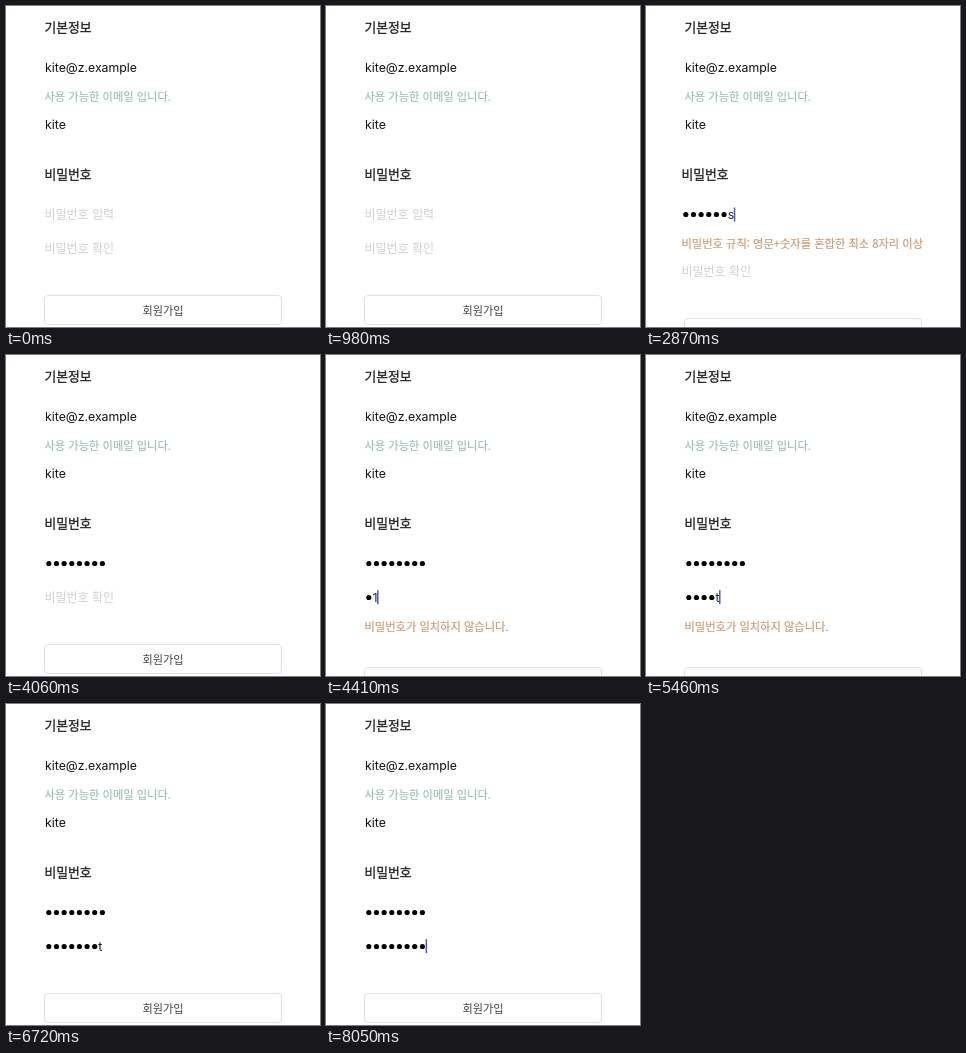
An HTML page that plays this animation: 314 px wide and 321 px high, repeating every 8400 ms.

```html
<!DOCTYPE html>
<html lang="ko">
<head>
<meta charset="utf-8">
<title>회원가입</title>
<style>
  html, body { margin: 0; width: 100%; height: 100%; overflow: hidden; background: #fff; }
  svg { display: block; width: 100vw; height: 100vh; }
  text { font-family: "Noto Sans CJK KR", "Noto Sans CJK", sans-serif; font-size: 11.25px; font-weight: 400; white-space: pre; }
  .title { font-size: 12.8px; fill: #222; stroke: #222; stroke-width: 0.3px; }
  .value { font-family: Inter, sans-serif; font-size: 12.3px; fill: #111; }
  .hint { font-size: 12px; fill: #d0d0d0; }
  .good { fill: #94bbad; stroke: #94bbad; stroke-width: 0.1px; }
  .bad { fill: #cc9a76; stroke: #cc9a76; stroke-width: 0.2px; }
  .label { font-size: 11.2px; fill: #444; text-anchor: middle; }
  .box { fill: #fff; stroke: #e0e0e0; }
  .dot { fill: #000; }
  #caret { fill: #4a5ab2; }
</style>
</head>
<body>
<svg viewBox="0 0 314 321">
  <text class="title" x="38.5" y="26">기본정보</text>
  <text class="value" x="39" y="66">kite@z.example</text>
  <text class="good" x="38.5" y="94.5">사용 가능한 이메일 입니다.</text>
  <text class="value" x="39" y="122.5">kite</text>

  <g id="section">
    <text class="title" x="38.5" y="173">비밀번호</text>
    <g id="first">
      <text class="hint" x="38.5" y="213">비밀번호 입력</text>
    </g>
    <text id="rule" class="bad" x="38.5" y="241.5">비밀번호 규칙: 영문+숫자를 혼합한 최소 8자리 이상</text>
    <g id="second">
      <text class="hint" x="38.5" y="247">비밀번호 확인</text>
    </g>
    <text id="mismatch" class="bad" x="38.5" y="275.5">비밀번호가 일치하지 않습니다.</text>
    <rect id="caret" y="201.5" width="1.5" height="14"/>
  </g>

  <g id="button">
    <rect class="box" x="38.5" y="289.5" width="237" height="29" rx="3.5"/>
    <text class="label" x="157" y="308.7">회원가입</text>
  </g>
</svg>
<script>
const LOOP = 8400, TICK = 70, LENGTH = 8;
const LEFT = 39.2, PITCH = 7.65, GAP = 34;
const NS = "http://www.w3.org/2000/svg";
const $ = id => document.getElementById(id);

// [time, masked characters, visible last character]
const firstKeys = [
  [0, 0, ""], [1260, 0, "1"], [1470, 1, "1"], [1750, 2, "1"], [1960, 3, "1"],
  [2590, 4, "t"], [2730, 5, "e"], [2870, 6, "s"], [3010, 7, "t"], [3360, 8, ""]
];
const secondKeys = [
  [0, 0, ""], [4200, 0, "1"], [4410, 1, "1"], [4690, 2, "1"], [4900, 3, "1"],
  [5460, 4, "t"], [5740, 5, "e"], [5880, 6, "s"], [5950, 7, "t"], [8050, 8, ""]
];
// [time, caret opacity], joined by straight fades
const blink = [
  [0, 0], [210, 0], [420, 1], [840, 1], [980, 0], [1259, 0], [1260, 1],
  [2450, 1], [2589, 0], [2590, 1], [3850, 1], [4060, 0], [4199, 0], [4200, 1],
  [6440, 1], [6720, 0], [6930, 0], [7140, 1], [7490, 1], [7770, 0],
  [8049, 0], [8050, 1], [LOOP, 1]
];

const show = (el, on) => el.setAttribute("visibility", on ? "visible" : "hidden");
const move = (el, x, y) => el.setAttribute("transform", `translate(${x} ${y})`);

function add(parent, tag, attrs) {
  const el = document.createElementNS(NS, tag);
  for (const name in attrs) el.setAttribute(name, attrs[name]);
  return parent.appendChild(el);
}

function makeField(id, y) {
  const root = $(id), hint = root.querySelector(".hint"), dots = [];
  for (let i = 0; i < LENGTH; i++) {
    dots.push(add(root, "circle", { class: "dot", cx: LEFT + PITCH * (i + 0.5) - 0.2, cy: y - 4.5, r: 2.6 }));
  }
  const last = add(root, "text", { class: "value", y });
  return {
    root,
    draw(count, char) {
      const x = LEFT + PITCH * count - 0.4;
      show(hint, !count && !char);
      dots.forEach((dot, i) => show(dot, i < count));
      last.setAttribute("x", x);
      last.textContent = char;
      return x + (char ? last.getComputedTextLength() : 0);
    },
    tint(color) { last.style.fill = color; }
  };
}

const first = makeField("first", 213);
const second = makeField("second", 247);

function keyAt(keys, t) {
  return keys.reduce((found, key) => key[0] <= t ? key : found);
}

function fadeAt(t) {
  const i = blink.findIndex(p => p[0] > t);
  const [t0, a] = blink[i - 1], [t1, b] = blink[i];
  return a + (b - a) * (t - t0) / (t1 - t0);
}

function draw(time) {
  const t = Math.floor((time % LOOP) / TICK) * TICK;
  const [, n1, c1] = keyAt(firstKeys, t);
  const [, n2, c2] = keyAt(secondKeys, t);
  const x1 = first.draw(n1, c1), x2 = second.draw(n2, c2);

  const typing = (n, c) => c !== "" && n + 1 < LENGTH;
  const weak = typing(n1, c1), differs = typing(n2, c2);
  show($("rule"), weak);
  show($("mismatch"), differs);
  move($("section"), weak ? -3 : 0, 0);
  move(second.root, 0, weak ? 23 : 0);
  move($("button"), 0, weak || differs ? 23 : 0);

  const onSecond = t >= 3360, alpha = fadeAt(t);
  const caret = $("caret");
  caret.setAttribute("x", (onSecond ? x2 : x1) - 0.4);
  move(caret, 0, onSecond ? GAP - 0.3 : 0);
  caret.setAttribute("opacity", alpha);
  const color = `rgb(${17 + 10 * alpha}, ${17 + 18 * alpha}, ${17 + 60 * alpha})`;
  first.tint(color);
  second.tint(color);
}

const start = performance.now();
function frame() {
  draw(performance.now() - start);
  requestAnimationFrame(frame);
}
frame();
</script>
</body>
</html>
```
